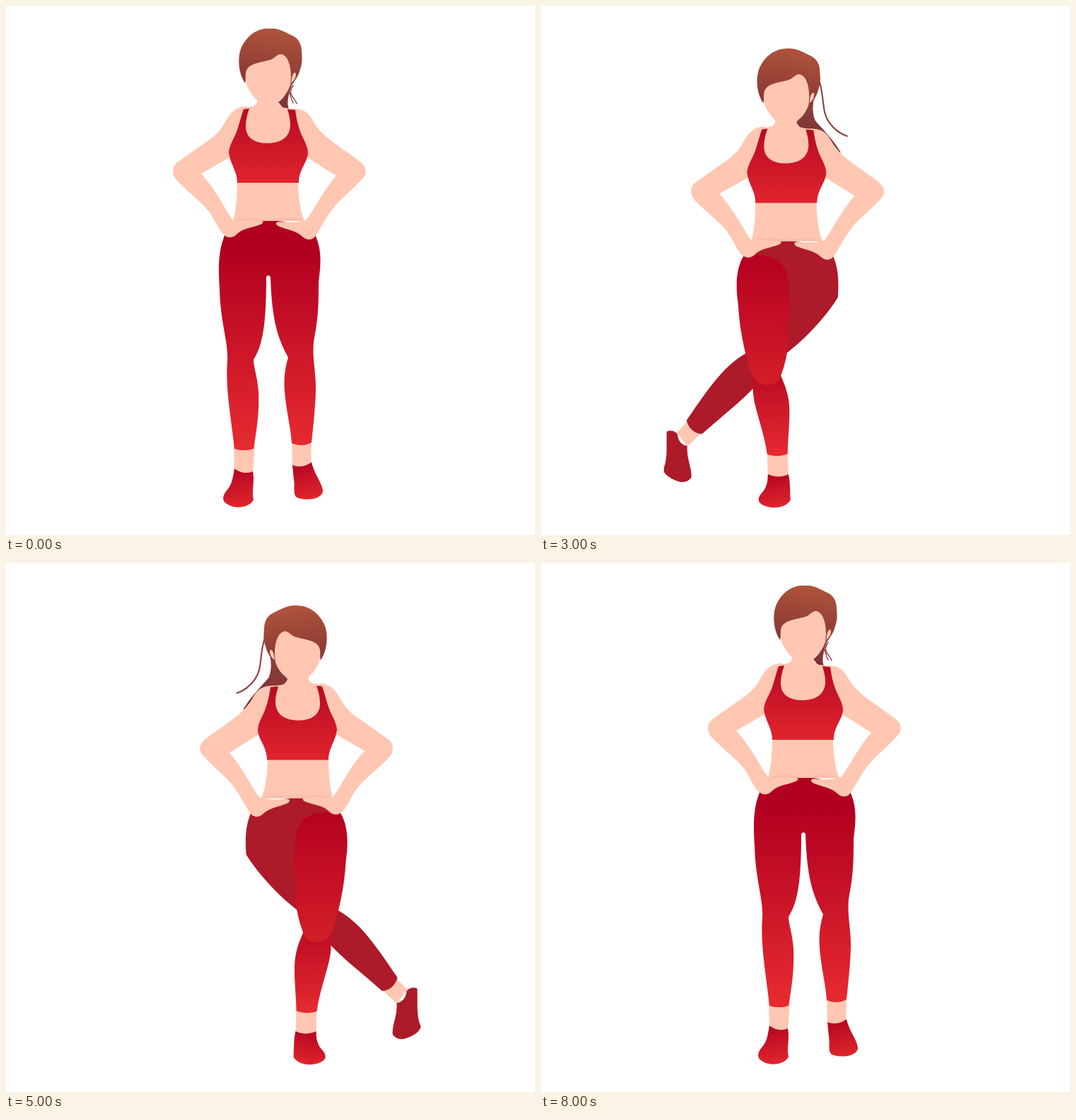
An HTML page without scripts for the animation above (9000 ms loop, 748 by 748 pixels).

```html
<!DOCTYPE html>
<html lang="en">
<head>
<meta charset="utf-8">
<title>Curtsy lunge</title>
<style>
  html, body { margin: 0; width: 100%; height: 100%; overflow: hidden; background: #fff; }
  svg { display: block; width: 100vw; height: 100vh; }
  .skin { fill: #ffc7b2; }
  .fold { fill: #fabda9; }
  .dark { fill: #ad1a2a; }
  .lock { fill: none; stroke: #8d4a45; stroke-width: 2.2; stroke-linecap: round; }
  /* each pose owns one second of the nine second loop */
  .pose {
    visibility: hidden;
    animation: show 9s step-end infinite;
    animation-delay: calc((var(--slot) - 9) * 1s);
  }
  @keyframes show {
    0% { visibility: visible; }
    11.1111%, 100% { visibility: hidden; }
  }
</style>
</head>
<body>
<svg viewBox="0 0 748 748">
  <defs>
    <linearGradient id="hair" x1=".55" y1="0" x2=".4" y2="1">
      <stop offset="0" stop-color="#b0533c"/><stop offset="1" stop-color="#863733"/>
    </linearGradient>
    <linearGradient id="tail" x1="0" y1="0" x2="0" y2="1">
      <stop offset="0" stop-color="#93433a"/><stop offset="1" stop-color="#7a2f33"/>
    </linearGradient>
    <linearGradient id="top" x1="0" y1="0" x2="0" y2="1">
      <stop offset="0" stop-color="#b80a23"/><stop offset="1" stop-color="#e0242d"/>
    </linearGradient>
    <linearGradient id="pants" x1="0" y1="0" x2="0" y2="1">
      <stop offset=".13" stop-color="#b10020"/><stop offset="1" stop-color="#e72b30"/>
    </linearGradient>
    <linearGradient id="thigh" x1="0" y1="0" x2="0" y2="1">
      <stop offset="0" stop-color="#b50020"/><stop offset="1" stop-color="#d31e29"/>
    </linearGradient>
    <linearGradient id="calf" x1="0" y1="0" x2="0" y2="1">
      <stop offset="0" stop-color="#b80a23"/><stop offset="1" stop-color="#e72b30"/>
    </linearGradient>
    <linearGradient id="shoe" x1=".4" y1="0" x2=".55" y2="1">
      <stop offset="0" stop-color="#b40521"/><stop offset="1" stop-color="#e0262d"/>
    </linearGradient>

    <clipPath id="standBox"><rect x="236" y="32" width="274" height="678"/></clipPath>
    <clipPath id="crossBox"><rect x="175" y="57" width="311" height="653"/></clipPath>
    <clipPath id="floor"><rect x="-100" y="0" width="948" height="710"/></clipPath>

    <g id="body">
      <path class="skin" d="M355 125V134C355 141 348 143 339 143L324 180 327 245C327 270 325 290 321 304H422C416 290 413 270 413 245L418 180 407 145C394 145 386 143 385 136V120Z"/>
      <path class="fold" d="M322 303C340 298 356 299 372 302 388 299 404 298 421 303L420 304H322Z"/>
      <path class="skin" d="M340 142C324 142 317 152 311 162 305 174 297 182 289 188L245 219C235 225 233 236 241 246 256 262 278 278 288 292 297 305 301 319 310 325 316 329 322 327 326 323 335 314 346 314 357 310 363 308 366 305 361 304 348 303 336 306 322 303 314 297 303 268 276 237L318 213 345 180Z"/>
      <path class="skin" d="M405 145C422 144 429 153 434 162 440 173 449 182 459 190L498 218C511 227 511 237 505 243 492 258 476 270 464 284 449 303 443 320 436 327 431 332 425 331 419 326 411 318 400 317 390 313 381 311 380 306 385 305 400 307 412 306 424 303 432 295 446 264 467 240L426 214 400 180Z"/>
      <path fill="url(#top)" d="M336 146 344 145C341 153 339 162 339 170 339 186 351 194 370 194 389 194 402 185 402 168 402 160 400 153 398 146L409 147C411 161 413 169 417 180 421 189 427 199 427 208 426 222 414 231 414 250H327C327 233 317 224 315 207 316 196 322 188 326 178 330 167 332 157 336 146Z"/>
      <path class="skin" d="M337 88C336 110 345 124 356 134 362 143 381 143 387 133 397 126 403 112 403 106L412 97 409 86 393 62 352 72Z"/>
      <path fill="url(#hair)" d="M338 109C328 94 327 72 333 58 342 40 356 31.5 373 31.5 388 31.5 396 38 403 41 413 45 418 53 418 65 419 74 419 82 416 89 414 99 408 106 404 112 401 110 403 106 403 100 403 85 399 70 389 68 383 68 380 74 374 76 361 80 347 80 341 89 337 96 340 102 338 109Z"/>
      <path class="skin" d="M404 103C405 95 409 92 410 96 410 101 408 105 403 109Z"/>
    </g>

    <g id="longTail">
      <path fill="url(#tail)" d="M380 122C382 145 372 155 361 162 364 170 372 178 387 180 402 183 414 194 423 207L425 207C414 188 397 172 389 162 383 148 386 132 392 112Z"/>
      <path class="lock" d="M394 104C403 130 397 149 409 165 417 176 425 181 434 184"/>
    </g>

    <g id="stand">
      <path fill="url(#tail)" d="M400 108C399 121 393 130 385 136L393 146 400 146C396 135 400 126 404 112Z"/>
      <path class="lock" style="stroke-width:1.5" d="M406 112C397 126 408 128 411 138M400 120C403 127 403 132 406 137"/>
      <path class="skin" d="M322 618 352 618 349 662 323 659ZM404 610H432L431 653 405 652Z"/>
      <path fill="url(#shoe)" d="M323 654C330 660 341 662 349 658 352 672 347 687 350 698 345 709 325 712 314 705 304 700 306 692 313 684 320 676 321 665 323 654Z"/>
      <path fill="url(#shoe)" d="M405 649C413 653 425 651 432 645 436 663 449 677 448 687 445 698 424 700 411 695 405 690 409 679 407 670Z"/>
      <path fill="url(#pants)" d="M311 320C300 344 300 368 302 400 303 447 315 477 313 502 310 540 318 580 323 626 332 629 342 629 350 626 356 592 358 570 357 545 355 521 350 511 350 500 363 480 368 450 368 383Q371 379 374 383C376 450 386 472 399 497 392 520 393 538 395 555 398 580 403 600 404 618 412 622 425 622 432 617 435 590 438 560 438 540 438 515 433 500 435 475 442 440 442 420 442 390 446 360 446 344 437 323 420 310 390 303 372 303 352 303 325 311 311 320Z"/>
      <use href="#body"/>
    </g>

    <g id="backFoot">
      <path class="skin" d="M212 584 193 603 208 623 228 604Z"/>
      <path class="dark" d="M179 602C184 599 191 601 194 605 195 615 200 621 208 622 207 641 214 650 214 666 209 675 198 674 192 671 183 668 174 661 174 655 181 640 178 620 179 602Z"/>
    </g>

    <g id="shin">
      <path class="skin" d="M321 628H350L351 667 322 667Z"/>
      <path fill="url(#shoe)" d="M322 662C330 666 342 667 351 662 354 674 353 686 354 698 350 708 331 713 316 706 307 702 307 696 313 689 320 682 322 673 322 662Z"/>
      <path fill="url(#calf)" d="M304 515C300 532 300 545 303 560 308 582 318 610 321 634 329 637 343 637 350 633 350 613 354 582 352 562 350 545 345 533 339 520Z"/>
    </g>

    <g id="cross">
      <use href="#longTail"/>
      <use href="#backFoot"/>
      <path class="dark" d="M290 350C310 338 330 332 349 332 370 332 395 340 414 353 423 373 422 395 421 412 405 438 376 470 347 492L301 541C279 564 252 584 229 605 219 605 210 598 207 586 245 530 262 508 291 491L300 400Z"/>
      <use href="#shin"/>
      <path fill="url(#thigh)" d="M288 353C277 370 276 395 280 422 282 460 290 492 297 515 302 530 310 536 321 536 332 536 338 530 341 521 350 496 351 480 351 460 354 430 353 400 350 382 344 361 330 354 313 353 304 352 295 350 288 353Z"/>
      <use href="#body" x="-22.5" y="28.5"/>
    </g>

    <!-- lowest point of the lunge -->
    <g id="dip">
      <use href="#longTail" x="-7" y="40"/>
      <use href="#backFoot" x="-36" y="0"/>
      <path class="dark" d="M283 390C303 378 323 372 342 372 363 372 388 380 407 393 416 413 415 435 414 452 398 478 371 505 343 523L297 553C260 577 220 590 192 605 182 604 174 597 171 586 208 546 238 520 284 511L293 440Z"/>
      <use href="#shin"/>
      <path fill="url(#thigh)" d="M281 393C270 410 270 433 274 455 278 483 288 505 296 522 302 536 310 542 321 542 332 542 338 535 341 525 347 507 346 494 346 480 348 455 347 438 343 422 337 401 323 394 306 393 297 392 288 390 281 393Z"/>
      <use href="#body" x="-29.5" y="68.5"/>
    </g>
  </defs>

  <rect width="748" height="748" fill="#fff"/>

  <g class="pose" style="--slot:0"><use href="#stand" clip-path="url(#standBox)"/></g>
  <g class="pose" style="--slot:1"><use href="#cross" clip-path="url(#crossBox)"/></g>
  <g class="pose" style="--slot:2"><use href="#dip" clip-path="url(#floor)"/></g>
  <g class="pose" style="--slot:3"><use href="#cross" clip-path="url(#crossBox)" transform="translate(-1.2)"/></g>
  <g class="pose" style="--slot:4"><use href="#stand" clip-path="url(#standBox)"/></g>
  <g class="pose" style="--slot:5"><use href="#cross" clip-path="url(#floor)" transform="matrix(-1 0 0 1 760.5 0)"/></g>
  <g class="pose" style="--slot:6"><use href="#dip" clip-path="url(#floor)" transform="matrix(-1 0 0 1 757.5 0)"/></g>
  <g class="pose" style="--slot:7"><use href="#cross" clip-path="url(#floor)" transform="matrix(-1 0 0 1 758.3 0)"/></g>
  <g class="pose" style="--slot:8"><use href="#stand" clip-path="url(#standBox)"/></g>
</svg>
</body>
</html>
```
